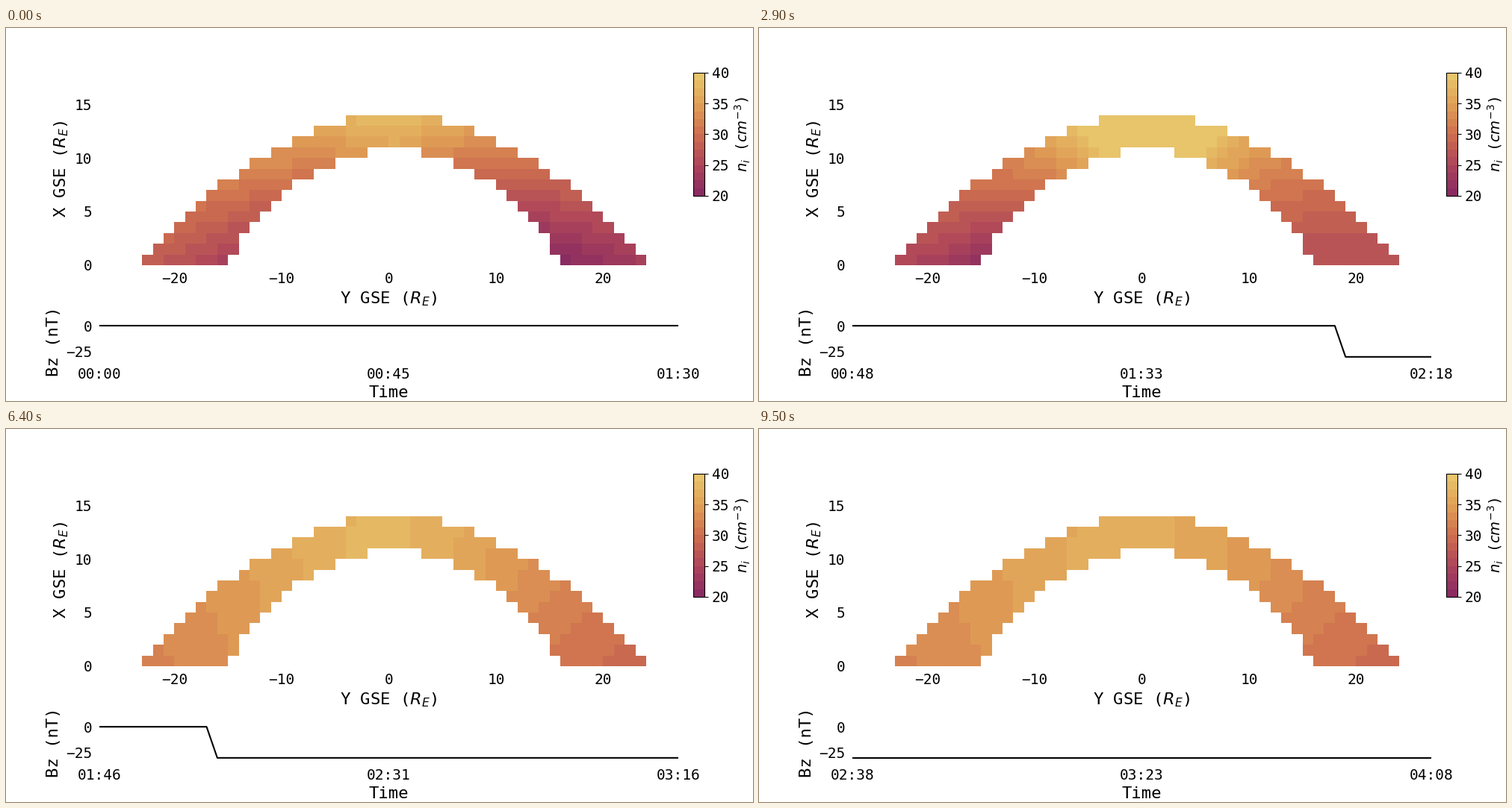
Recreate the animation shown at these times as a matplotlib script. Size 1000 by 500 pixels, loop 9600 ms.

```python
import matplotlib.pyplot as plt
import numpy as np
from matplotlib.animation import FuncAnimation
from matplotlib.colors import LinearSegmentedColormap

plt.rcParams["font.family"] = "DejaVu Sans Mono"
plt.rcParams["font.size"] = 14
plt.rcParams["axes.labelsize"] = 16

FRAMES, INTERVAL = 96, 100
STEP_SECONDS = 100
SPAN = 54            # samples across the Bz window (90 minutes)
LAST_NORTH = 74      # last sample before Bz turns southward
ARRIVAL = 21         # frame at which the pulse reaches the nose

CMAP = LinearSegmentedColormap.from_list(
    "dusk", ["#8a2b62", "#af475a", "#ce6f4f", "#e09e55", "#e8c46a"], N=16)

# The sheath lies between two parabolas: outer > 0 and inner > 0
y, x = np.meshgrid(np.arange(-27, 27), np.arange(18))
outer = 13.45 - x - y**2 / 40
height = 10.36 - x
inner = y**2 / 24.3 - height + height**2 / 600
outside = (outer < 0) | (inner <= 0)
depth = inner / np.where(outside, 1, inner + outer) - 0.5
flank = np.arctan2(y, x) / (np.pi / 2)     # -1 left, 0 nose, 1 right


def density(frame):
    decline = 3.7 * min(frame / ARRIVAL, 1) * (1 - 0.3 * abs(flank))
    quiet = (37.3 - (12.9 + 2.1 * np.sign(flank)) * abs(flank) ** 1.2
             - decline + 3.4 * depth)

    # Dense wind spreads from the nose, later on the left, then relaxes
    elapsed = frame - ARRIVAL
    delay = 8 * np.maximum(-flank, 0)
    arrived = 1 - np.exp(-np.maximum(elapsed - delay, 0) / 7.6)
    pulse = 24.5 * np.exp(-max(elapsed, 0) / 15 - (flank / 0.42) ** 2)
    settled = 36.4 - 4.9 * flank**2 - 1.4 * flank - 1.3 * depth * abs(flank)

    values = quiet + arrived * (settled + pulse - quiet)
    return np.ma.array(values, mask=outside)


def clock(seconds):
    minutes = seconds // 60
    return f"{minutes // 60:02d}:{minutes % 60:02d}"


def bare_axes(top, bottom):
    ax = fig.add_axes([0.125, 1 - bottom / 500, 0.775, (bottom - top) / 500])
    ax.patch.set_visible(False)
    ax.spines[:].set_visible(False)
    ax.tick_params(width=0)
    return ax


fig = plt.figure(figsize=(10, 5), dpi=100, facecolor="white")

sheath = bare_axes(59.27, 317.6)
image = sheath.imshow(density(0), cmap=CMAP, vmin=20, vmax=40, origin="lower",
                      extent=(-27, 27, 0, 18), aspect="auto",
                      interpolation="nearest")
sheath.set(xticks=range(-20, 21, 10), yticks=range(0, 16, 5),
           xlabel="Y GSE ($R_E$)", ylabel="X GSE ($R_E$)")

bar_axes = fig.add_axes([0.92, 0.55, 0.015, 0.33])
bar = fig.colorbar(image, cax=bar_axes, ticks=range(20, 41, 5))
bar.set_label("$n_i$ ($cm^{-3}$)", size=14)

field = bare_axes(395, 445)
field.set(xlim=(0, SPAN), ylim=(-33, 3), xticks=[0, SPAN / 2, SPAN],
          yticks=[-25, 0], xlabel="Time", ylabel="Bz (nT)")
trace, = field.plot([], [], color="black", lw=1.5)


def update(frame):
    image.set_data(density(frame))
    offsets = np.arange(SPAN + 2)
    trace.set_data(offsets, np.where(frame + offsets > LAST_NORTH, -30, 0))
    start = frame * STEP_SECONDS
    field.set_xticklabels([clock(start + m * 60) for m in (0, 45, 90)])
    return image, trace


anim = FuncAnimation(fig, update, frames=FRAMES, interval=INTERVAL,
                     init_func=lambda: update(0), repeat=True, repeat_delay=0)
plt.show()
```
